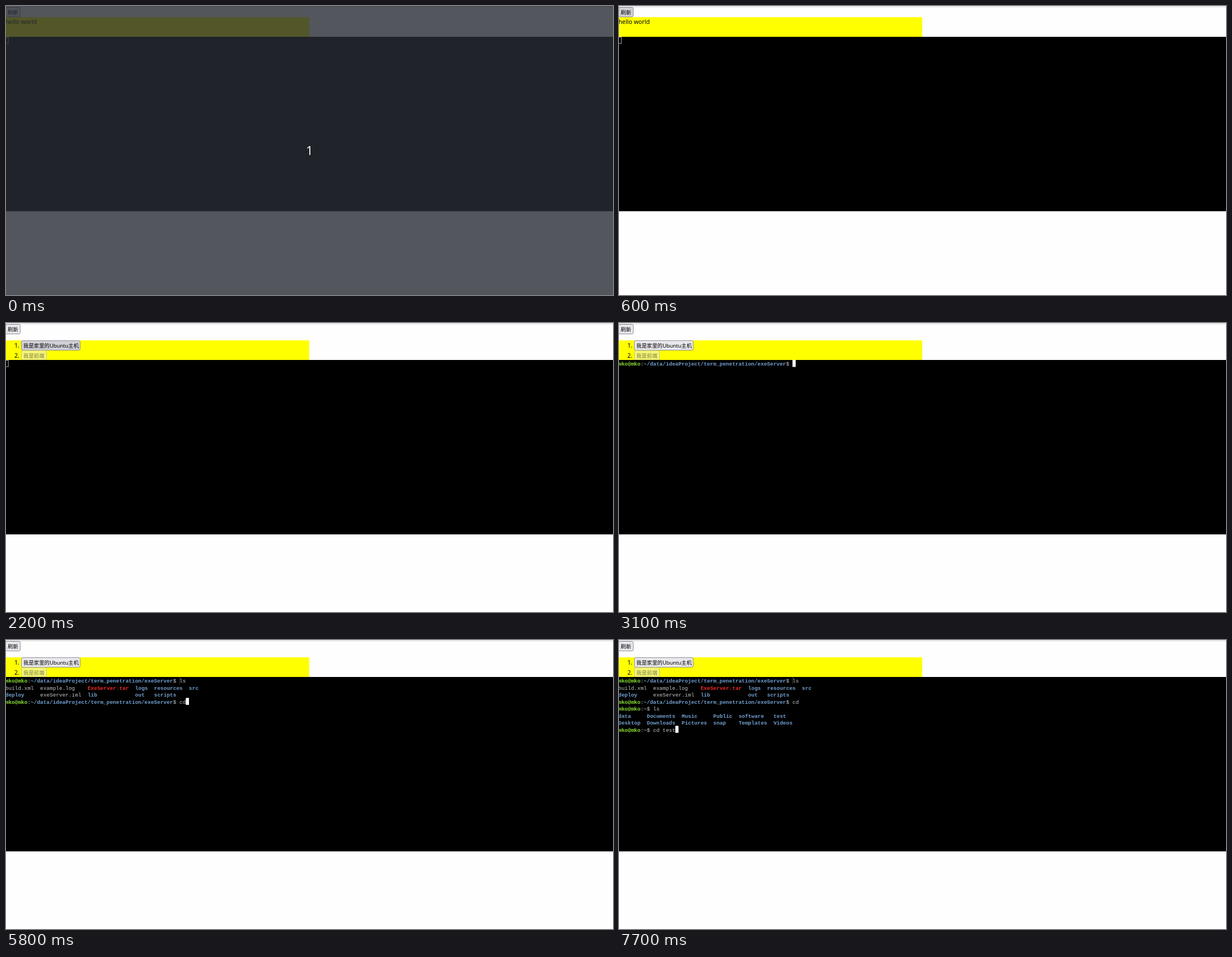
An HTML page for the animation above (8000 ms loop, 1085 by 516 pixels).

```html
<!DOCTYPE html>
<html lang="zh-CN">
<head>
<meta charset="utf-8">
<style>
  html, body { margin: 0; width: 100%; height: 100%; overflow: hidden; background: #fefefe; }
  svg { display: block; width: 1085px; height: 516px; }
  text { white-space: pre; }
  .page { font: 10.7px "Noto Sans", "Noto Sans CJK SC", "Noto Sans CJK", sans-serif; }
  .button { font-size: 9.4px; }
  .term { font: 9.43px "Liberation Mono", monospace; }
  .plain { fill: #c6c6c6; }
  .user, .dir, .archive { font-weight: bold; }
  .user { fill: #8ae234; }
  .dir { fill: #729fcf; }
  .archive { fill: #ef2929; }
</style>
</head>
<body>
<svg id="stage" viewBox="0 0 1085 516"></svg>
<script>
const LOOP = 8000;
const LIST_AT = 1200, FOCUS_AT = 3100;
const CELL = 5.66, ROW = 12.46, LEFT = -1.2, TOP = 66;
const NORMAL = '#e9e9ed', HOVER = '#d0d0d7', ACTIVE = '#b1b1b9';

const stage = document.getElementById('stage');

function add(parent, tag, attrs = {}, text = '') {
  const node = document.createElementNS('http://www.w3.org/2000/svg', tag);
  for (const key in attrs) node.setAttribute(key, attrs[key]);
  node.textContent = text;
  return parent.appendChild(node);
}

function show(node, visible) {
  node.setAttribute('visibility', visible ? 'visible' : 'hidden');
}

// Latest value of a [time, value] list at time t.
function valueAt(steps, t, initial) {
  return steps.reduce((value, [time, next]) => t >= time ? next : value, initial);
}

function button(parent, x, y, width, label, { fill = NORMAL, border = '#8f8f9d', color = '#000' } = {}) {
  const box = add(parent, 'rect', {
    x: x + .5, y: y + .5, width: width - 1, height: 17, rx: 2.5, fill, stroke: border
  });
  add(parent, 'text', { class: 'button', x: x + 4, y: y + 12.9, fill: color }, label);
  return box;
}

// Page
const page = add(stage, 'g', { class: 'page' });
add(page, 'rect', { width: 1085, height: 516, fill: '#fefefe' });
add(page, 'rect', { y: 1, width: 1085, height: 1, fill: '#cbcbcb' });
const refresh = button(page, -1, 2, 27, '刷新');

const greeting = add(page, 'g');
add(greeting, 'rect', { y: 20, width: 542, height: 35, fill: '#ff0' });
add(greeting, 'text', { x: -1, y: 32 }, 'hello world');

const list = add(page, 'g');
add(list, 'rect', { y: 31, width: 542, height: 35, fill: '#ff0' });
add(list, 'text', { x: 15, y: 44.2 }, '1.');
add(list, 'text', { x: 15, y: 61.9 }, '2.');
const host = button(list, 27, 31, 106, '我是家里的Ubuntu主机');
button(list, 27, 48.6, 46, '我是前端', { fill: '#f4f477', border: '#c8c86c', color: '#83833f' });

// Terminal
const term = add(stage, 'g', { class: 'term' });
add(term, 'rect', { y: TOP, width: 1085, height: 311.4 });
const caretMark = add(term, 'rect', { x: 309.5, y: TOP, width: 1, height: 12.5, fill: '#3c3c3c' });

const cellX = col => LEFT + col * CELL;
const rowY = row => TOP + row * ROW;

function prompt(path) {
  const end = 8 + path.length;
  return [[0, 'mko@mko', 'user'], [7, ':', 'plain'], [8, path, 'dir'], [end, '$ ', 'plain']];
}

function names(columns, words, styles = {}) {
  return words.split(' ').map((word, i) => [columns[i], word, styles[word] || 'dir']);
}

const PROJECT = '~/data/ideaProject/term_penetration/exeServer';
const PROJECT_COLS = [0, 11, 26, 41, 47, 58], HOME_COLS = [0, 9, 20, 30, 38, 49];
const FILES = { 'build.xml': 'plain', 'example.log': 'plain', 'exeServer.iml': 'plain', 'ExeServer.tar': 'archive' };

const lines = [
  { row: 0, at: 0, parts: [] },
  { row: 0, at: 2500, parts: prompt(PROJECT), typed: [[5100, 'l'], [5200, 'ls']] },
  { row: 1, at: 5400, parts: names(PROJECT_COLS, 'build.xml example.log ExeServer.tar logs resources src', FILES) },
  { row: 2, at: 5400, parts: names(PROJECT_COLS, 'deploy exeServer.iml lib out scripts', FILES) },
  { row: 3, at: 5400, parts: prompt(PROJECT), typed: [[5600, 'c'], [5800, 'cd']] },
  { row: 4, at: 6100, parts: prompt('~'), typed: [[6400, 'l'], [6600, 'ls']] },
  { row: 5, at: 6700, parts: [] },
  { row: 5, at: 6800, parts: names(HOME_COLS, 'data Documents Music Public software test') },
  { row: 6, at: 6800, parts: names(HOME_COLS, 'Desktop Downloads Pictures snap Templates Videos') },
  { row: 7, at: 6800, parts: prompt('~'),
    typed: [[6900, 'c'], [7000, 'cd'], [7100, 'cd '], [7500, 'cd t'], [7600, 'cd te'], [7700, 'cd test']] }
];

for (const line of lines) {
  const y = rowY(line.row) + 10.3;
  line.group = add(term, 'g');
  for (const [col, text, style] of line.parts) {
    add(line.group, 'text', { x: cellX(col), y, class: style }, text);
  }
  const last = line.parts[line.parts.length - 1];
  line.end = last ? last[0] + last[1].length : 0;
  line.input = add(line.group, 'text', { x: cellX(line.end), y, class: 'plain' });
}

const cursor = add(term, 'rect');

function placeCursor(line, length, focused) {
  const x = cellX(line.end + length), y = rowY(line.row);
  const look = focused
    ? { x, y, width: CELL, height: ROW, fill: '#fff', stroke: 'none' }
    : { x: x + .5, y: y + .5, width: CELL - .8, height: ROW - 1, fill: 'none', stroke: '#b4b4b4' };
  for (const key in look) cursor.setAttribute(key, look[key]);
}

// Countdown veil
const veil = add(stage, 'g', { class: 'page' });
add(veil, 'rect', { width: 1085, height: 516, fill: '#282c34', opacity: .8 });
add(veil, 'text', {
  x: 542.5, y: 266, fill: '#f2f2f2', 'text-anchor': 'middle', style: 'font-size:22px'
}, '1');

function render(t) {
  const listed = t >= LIST_AT;
  show(veil, t < 100);
  show(greeting, !listed);
  show(list, listed);
  term.setAttribute('transform', `translate(0 ${listed ? 0 : -11})`);

  refresh.setAttribute('fill', valueAt([[600, HOVER], [1300, NORMAL]], t, NORMAL));
  host.setAttribute('fill', valueAt(
    [[1500, HOVER], [1700, NORMAL], [2200, HOVER], [2300, ACTIVE], [2500, HOVER], [2600, NORMAL]], t, NORMAL));

  let current = lines[0];
  for (const line of lines) {
    const visible = t >= line.at;
    show(line.group, visible);
    line.input.textContent = valueAt(line.typed || [], t, '');
    if (visible) current = line;
  }
  show(caretMark, t >= 5100);
  placeCursor(current, current.input.textContent.length, t >= FOCUS_AT);
}

const start = performance.now();
function tick() {
  render((performance.now() - start) % LOOP);
  requestAnimationFrame(tick);
}
tick();
</script>
</body>
</html>
```
